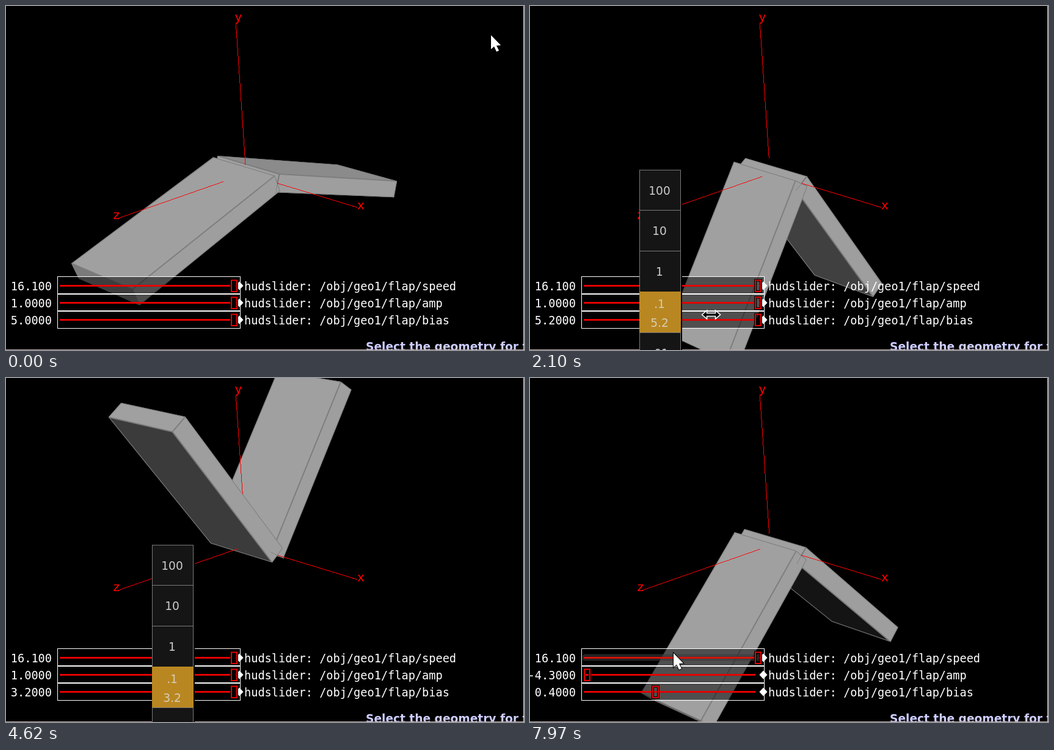
An HTML page with a canvas for the animation above (8000 ms loop, 848 by 565 pixels).

```html
<!DOCTYPE html>
<html lang="en">
<head>
<meta charset="utf-8">
<title>Flap sliders</title>
<style>
html, body { margin: 0; width: 100%; height: 100%; overflow: hidden; background: #000; }
canvas { display: block; }
</style>
</head>
<body>
<canvas id="view" width="848" height="565"></canvas>
<script>
const ctx = document.getElementById('view').getContext('2d');
const LOOP = 8000, STEP = 57, LEAD = 12;
const MONO = '18.6px "DejaVu Sans Mono", monospace';
const SANS = '"DejaVu Sans", sans-serif';

const clamp = (v, lo, hi) => Math.min(hi, Math.max(lo, v));
const mix = (a, b, k) => a + (b - a) * k;
const ramp = (t, from, to) => clamp((t - from) / (to - from), 0, 1);
function ease(t, from, to) {
  const k = ramp(t, from, to);
  return k * k * (3 - 2 * k);
}

// Values scrubbed by the user, and how far the flap's phase strays with them.
const biasAt = t => 5 + 0.2 * ease(t, 1.85, 2.05) + 3.1 * ease(t, 2.2, 2.8)
  - 5.1 * ease(t, 3.7, 4.55) - 2.8 * ease(t, 4.65, 5.15);
const ampAt = t => 1 - 5.3 * ease(t, 6.66, 7.2);
const driftAt = t => 0.4 * ease(t, 1.75, 2.05) + 3.16 * ease(t, 2.5, 3)
  - 3.56 * ease(t, 3.5, 4.5) - 0.69 * ease(t, 5, 6.2) - 0.39 * ease(t, 6.7, 7.3);
const angleAt = t => 56.5 * Math.PI / 180 * Math.sin(14.07 * t - 0.324 + driftAt(t));

// Perspective: origin on screen, then weight and vanishing point per axis.
const ORIGIN = [393, 275.5];
const AXES = [[-0.0776, -1770, -383], [-0.0444, 754, 5623], [-0.1001, 2272, -383]];
function project(p) {
  let [x, y] = ORIGIN, w = 1;
  AXES.forEach(([k, vx, vy], i) => {
    w += p[i] * k;
    x += p[i] * k * vx;
    y += p[i] * k * vy;
  });
  return [x / w, y / w];
}

function path(points, close) {
  ctx.beginPath();
  points.forEach(([x, y], i) => i ? ctx.lineTo(x, y) : ctx.moveTo(x, y));
  if (close) ctx.closePath();
}

// Hard one-pixel line without smoothing.
function pixelLine([x0, y0], [x1, y1], color, skip = 1) {
  const n = Math.ceil(Math.max(Math.abs(x1 - x0), Math.abs(y1 - y0), 1));
  ctx.fillStyle = color;
  for (let i = 0; i <= n; i += skip) {
    ctx.fillRect(Math.floor(mix(x0, x1, i / n)), Math.floor(mix(y0, y1, i / n)), 1, 1);
  }
}

function text(str, x, y, font, color, align = 'left') {
  ctx.font = font;
  ctx.fillStyle = color;
  ctx.textAlign = align;
  ctx.fillText(str, x, y);
}

function area(q) {
  return q.reduce((s, [x, y], i) => {
    const n = q[(i + 1) % q.length];
    return s + x * n[1] - n[0] * y;
  }, 0);
}

const HALF = 0.06, WIDE = 0.3, LONG = 1.2;

// Corner bits: 1 = far end, 2 = upper, 4 = +x. side: 1 toward +z, -1 toward -z.
function wing(angle, side) {
  const s = Math.sin(angle), c = Math.cos(angle);
  const along = [s, side * c], up = [c, -side * s];
  const neg = v => v.map(k => -k);
  const pts = Array.from({ length: 8 }, (_, i) => {
    const u = i & 1 ? LONG : 0, n = i & 2 ? HALF : -HALF;
    return project([i & 4 ? WIDE : -WIDE, along[0] * u + up[0] * n, along[1] * u + up[1] * n]);
  });
  const faces = [
    { ids: [0, 4, 6, 2], normal: neg(along) },
    { ids: [0, 1, 5, 4], normal: neg(up), under: true },
    { ids: [1, 3, 7, 5], normal: along },
    { ids: [2, 6, 7, 3], normal: up },
    { ids: [4, 5, 7, 6], normal: null }
  ].map(f => ({ ...f, quad: f.ids.map(i => pts[i]) }));
  const sign = Math.sign(area(faces[4].quad));
  return { pts, seen: faces.filter(f => Math.sign(area(f.quad)) === sign) };
}

function shade(normal) {
  if (!normal) return 158;
  const [y, z] = normal;
  return clamp(230 * (0.643 * y + 0.766 * z) + (z < 0 ? -170 * z : 0), 0, 160);
}

function drawWing(w) {
  for (const f of w.seen) {
    const g = Math.round(shade(f.normal));
    path(f.quad, true);
    ctx.fillStyle = `rgb(${g},${g},${g})`;
    ctx.fill();
    ctx.save();
    ctx.clip();
    ctx.strokeStyle = '#7c7c7c';
    ctx.lineWidth = 2;
    ctx.stroke();
    ctx.restore();
  }
}

function drawAxis(i, from) {
  const at = d => project([0, 1, 2].map(k => k === i ? d : 0));
  pixelLine(at(from), at(1), '#f00');
}

function drawScene(t) {
  const angle = angleAt(t);
  const left = wing(angle, 1), right = wing(angle, -1);
  const zStart = Math.min(LONG, HALF / Math.max(0.001, Math.abs(Math.sin(angle))));
  const zBehind = angle > 0 && !left.seen.some(f => f.under);

  drawWing(right);
  drawAxis(1, HALF / Math.cos(angle));
  if (zBehind) drawAxis(2, zStart);
  drawWing(left);
  if (!zBehind) drawAxis(2, zStart);
  drawAxis(0, WIDE);
  pixelLine(right.pts[4], right.pts[6], '#6a6a6a', 2);

  const font = '20px ' + SANS;
  text('y', 374.5, 25, font, '#f00');
  text('x', 575, 333.5, font, '#f00');
  text('z', 175.5, 350, font, '#f00');
}

function drawSlider(row, name, value, shown, hover) {
  const top = 444.5 + row * 28, mid = top + 15;
  ctx.fillStyle = 'rgba(0,0,0,0.5)';
  ctx.fillRect(84, top, 300, 28);
  ctx.strokeStyle = '#fff';
  ctx.lineWidth = 1;
  ctx.strokeRect(84.5, top, 299, row < 2 ? 28 : 29);
  if (row) {
    ctx.fillStyle = '#fff';
    ctx.fillRect(84, top - 0.5, 300, 2);
  }
  if (hover) {
    ctx.fillStyle = 'rgba(60,60,60,0.6)';
    ctx.beginPath();
    ctx.roundRect(86, mid - 6, 293, 11, 4);
    ctx.fill();
  }
  ctx.fillStyle = '#d00000';
  ctx.fillRect(88, mid - 1.5, 281, 3);
  ctx.fillStyle = hover ? '#d82c14' : '#f00';
  ctx.fillRect(88, mid - 0.5, 281, 1);

  path([[375.5, mid], [382, mid - 7], [388.5, mid], [382, mid + 7]], true);
  ctx.fillStyle = '#fff';
  ctx.fill();
  const hx = 93.5 + 280 * clamp(value, 0, 1);
  ctx.strokeStyle = '#000';
  ctx.lineWidth = 4;
  ctx.strokeRect(hx - 4.5, mid - 9, 9, 18.5);
  ctx.strokeStyle = '#e80000';
  ctx.lineWidth = 2;
  ctx.strokeRect(hx - 4.5, mid - 9, 9, 18.5);

  text(shown, 75, top + 22.5, MONO, '#fff', 'right');
  text('hudslider: /obj/geo1/flap/' + name, 390, top + 22.5, MONO, '#fff');
}

// Each scrub: time span, ladder corner, place where the mouse was pressed, value.
const SCALE = 143;
const SCRUBS = [
  { from: 1.8, to: 2.87, x: 179.5, y: 269.5, press: [268, 507], value: biasAt },
  { from: 3.6, to: 5.35, x: 239.5, y: 274.5, press: [285, 514], value: biasAt },
  { from: 6.5, to: 7.36, x: 277.5, y: 245.5, press: [286, 491], value: ampAt }
];

function drawLadder({ x, y }, value) {
  const font = '18.6px ' + SANS;
  const edge = i => y + Math.floor(i * 66.75);
  ctx.fillStyle = '#000';
  ctx.fillRect(x + 67.5, y, 2, 565);
  ['100', '10', '1', '.1', '.01'].forEach((label, i) => {
    const top = edge(i), on = i === 3;
    ctx.fillStyle = on ? '#b98721' : '#151515';
    ctx.strokeStyle = on ? '#b98721' : '#7a7a7a';
    ctx.lineWidth = 1;
    ctx.fillRect(x, top, 67, edge(i + 1) - top);
    ctx.strokeRect(x, top, 67, edge(i + 1) - top);
    text(label, x + 32.5, top + (on ? 26.5 : 40.5), font, on ? '#d6ccb4' : '#ccc', 'center');
    if (on) text(value, x + 32.5, top + 57.5, font, '#d6ccb4', 'center');
  });
}

// Pointer between scrubs.
function pointerAt(t) {
  const [a, b, c] = SCRUBS;
  if (t < a.from) {
    const k = ramp(t, 0, 1.75) ** 1.45;
    return [mix(794, a.press[0], k), mix(48, a.press[1], k * k)];
  }
  if (t < b.from) return [mix(227, b.press[0], ease(t, 3.2, b.from)), 514];
  if (t < c.from) {
    const swing = Math.sin(Math.PI * ramp(t, b.to, c.from));
    return [286 + 540 * swing, mix(514, 491, ramp(t, b.to, c.from)) - 80 * swing];
  }
  const k = ease(t, c.to, 7.85);
  return [mix(c.press[0], 235, k), mix(c.press[1], 452, k)];
}

function drawPointer([x, y]) {
  const arrow = [[0, 0], [0, 23], [5, 18.5], [9, 27], [13, 25.2], [9, 17], [16, 16.5]];
  path(arrow.map(([a, b]) => [x + a, y + b]), true);
  ctx.fillStyle = '#fff';
  ctx.strokeStyle = '#000';
  ctx.lineWidth = 2;
  ctx.stroke();
  ctx.fill();
}

function drawResize(x, y) {
  const half = [[-15, 0], [-7, -7], [-7, -2.5], [7, -2.5], [7, -7]];
  const shape = half.concat(half.map(([a, b]) => [-a, -b]));
  path(shape.map(([a, b]) => [x + a, y + b]), true);
  ctx.fillStyle = '#000';
  ctx.strokeStyle = '#fff';
  ctx.lineWidth = 1.6;
  ctx.fill();
  ctx.stroke();
}

function draw(t) {
  ctx.fillStyle = '#000';
  ctx.fillRect(0, 0, 848, 565);
  drawScene(t);

  const round = v => Math.round(v * 10) / 10;
  const bias = round(biasAt(t)), amp = round(ampAt(t));
  drawSlider(0, 'speed', 16.1, '16.100', t > 7.75);
  drawSlider(1, 'amp', amp, amp.toFixed(4));
  drawSlider(2, 'bias', bias, bias.toFixed(4));
  text('Select the geometry for the', 589, 565.5, 'bold 18.6px ' + SANS, '#ccccff');

  ctx.fillStyle = '#b9a4a4';
  ctx.fillRect(0, 564, 848, 1);
  ctx.fillStyle = '#ddd';
  ctx.fillRect(847, 0, 1, 565);

  const scrub = SCRUBS.find(s => t >= s.from && t < s.to);
  if (scrub) {
    const { press, value, from } = scrub;
    drawLadder(scrub, String(round(value(t))));
    drawResize(press[0] + SCALE * (value(t) - value(from)), press[1]);
  } else {
    drawPointer(pointerAt(t));
  }
}

function tick() {
  const ms = performance.now() % LOOP;
  draw(Math.floor((ms + LEAD) / STEP) * STEP / 1000);
  requestAnimationFrame(tick);
}
tick();
</script>
</body>
</html>
```
